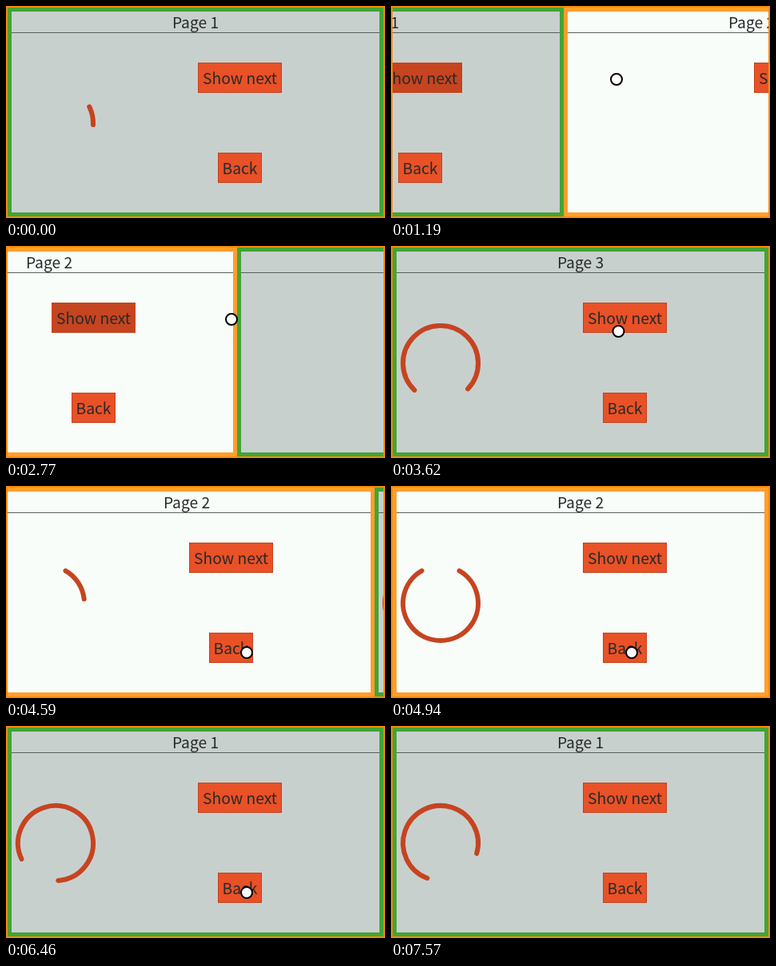
An HTML page for the animation above (7640 ms loop, 474 by 266 pixels).

```html
<!DOCTYPE html>
<html lang="en">
<head>
<meta charset="utf-8">
<title>Page stack</title>
<style>
  html, body { margin: 0; width: 100%; height: 100%; overflow: hidden; background: #fc8a0a; }
  svg { display: block; width: 474px; height: 266px; }
  text { font: 300 20px "Noto Sans CJK SC", "Noto Sans CJK JP", "Noto Sans", sans-serif; fill: #262a2a; text-anchor: middle; }
  .button { fill: #e95127; stroke: #c4431f; }
  .button.pressed { fill: #c64420; }
  .spinner { fill: none; stroke: #c64420; stroke-width: 6; stroke-linecap: round; }
  .cursor { fill: #fff; stroke: #000; stroke-width: 2; }
</style>
</head>
<body>
<svg viewBox="0 0 474 266">
  <defs><clipPath id="view"><rect x="2" y="2" width="470" height="262"/></clipPath></defs>
  <g id="pages" clip-path="url(#view)"></g>
  <circle class="cursor" r="7"/>
</svg>
<script>
const LOOP = 7640, PAGE_W = 470, SLIDE = 600, MOVE = 600, PRESS_LEAD = 70, HALF = 525;
const MIN_SPAN = 10, SWING = 290;

// Each click slides the stack by one page.
const clicks = [
  { at: 882, page: 0, button: 'next', step: 1 },
  { at: 2495, page: 1, button: 'next', step: 1 },
  { at: 4100, page: 2, button: 'back', step: -1 },
  { at: 5703, page: 1, button: 'back', step: -1 },
];
const moves = [
  { at: 190, from: [484, 140], to: [282, 92] },
  { at: 3430, from: [282, 92], to: [301, 209] },
  { at: 6636, from: [301, 209], to: [320, 282] },
];
// Spinner runs per page: first visible time, start of a growing phase, its angle.
const spins = [
  [{ show: 0, start: -131, angle: -26 }, { show: 5600, start: 6883, angle: 76 }],
  [{ show: 1640, start: 1640, angle: 134 }, { show: 4000, start: 4415, angle: 300 }],
  [{ show: 3252, start: 3252, angle: 134 }],
];

const clamp = v => Math.min(1, Math.max(0, v));
const ease = v => {
  const p = clamp(v);
  return p < 0.5 ? 4 * p ** 3 : 1 - 4 * (1 - p) ** 3;
};

function add(parent, tag, attrs, text = '') {
  const el = document.createElementNS('http://www.w3.org/2000/svg', tag);
  for (const name in attrs) el.setAttribute(name, attrs[name]);
  el.textContent = text;
  parent.append(el);
  return el;
}

function addButton(group, label, x, y, width) {
  const box = add(group, 'rect', { class: 'button', x: x + 0.5, y: y + 0.5, width: width - 1, height: 37 });
  add(group, 'text', { x: x + width / 2, y: y + 27 }, label);
  return box;
}

function makePage(index) {
  const white = index === 1;
  const root = add(document.getElementById('pages'), 'g', {});
  add(root, 'rect', { x: 2, y: 2, width: PAGE_W, height: 262, fill: white ? '#ff9e2c' : '#43a436' });
  add(root, 'rect', { x: 7, y: 7, width: 460, height: 252, fill: white ? '#f8fdf9' : '#c8d0ce' });
  add(root, 'rect', { x: 7, y: 33, width: 460, height: 1, fill: white ? '#5c5f5d' : '#53625a' });
  add(root, 'text', { x: 237, y: 28 }, `Page ${index + 1}`);
  return {
    root,
    spinner: add(root, 'path', { class: 'spinner' }),
    next: addButton(root, 'Show next', 240, 71, 105),
    back: addButton(root, 'Back', 265, 184, 55),
  };
}

const pages = [0, 1, 2].map(makePage);
const cursor = document.querySelector('.cursor');

// Pick the type size whose button label leaves the 6px padding.
const labels = [...document.querySelectorAll('text')];
const size = 20 * 93 / labels.find(l => l.textContent === 'Show next').getComputedTextLength();
labels.forEach(l => { l.style.fontSize = `${size.toFixed(2)}px`; });

function spinnerPath(index, time) {
  const run = spins[index].filter(s => time >= s.show).pop();
  if (!run) return '';
  const elapsed = time - run.start;
  const cycle = Math.floor(elapsed / (2 * HALF));
  const phase = elapsed / HALF - 2 * cycle;
  const base = run.angle + cycle * SWING;
  const tail = base + SWING * ease(phase - 1);
  const head = base + MIN_SPAN + SWING * ease(phase);
  const point = deg => {
    const a = deg * Math.PI / 180;
    return `${(62 + 47 * Math.cos(a)).toFixed(2)} ${(147 + 47 * Math.sin(a)).toFixed(2)}`;
  };
  return `M${point(tail)}A47 47 0 ${head - tail > 180 ? 1 : 0} 1 ${point(head)}`;
}

function draw(time) {
  const shift = clicks.reduce((sum, c) => sum + c.step * ease((time - c.at) / SLIDE), 0);
  pages.forEach((page, i) => {
    page.root.setAttribute('transform', `translate(${Math.round((i - shift) * PAGE_W)} 0)`);
    page.spinner.setAttribute('d', spinnerPath(i, time));
    for (const name of ['next', 'back']) {
      const pressed = clicks.some(c => c.page === i && c.button === name &&
        time >= c.at - PRESS_LEAD && time < c.at + SLIDE);
      page[name].classList.toggle('pressed', pressed);
    }
  });
  const move = moves.filter(m => time >= m.at).pop() || moves[0];
  const p = ease((time - move.at) / MOVE);
  const [x, y] = move.from.map((v, i) => v + (move.to[i] - v) * p);
  cursor.setAttribute('cx', x);
  cursor.setAttribute('cy', y);
}

const begin = performance.now();
function tick() {
  draw((performance.now() - begin) % LOOP);
  requestAnimationFrame(tick);
}
tick();
</script>
</body>
</html>
```
